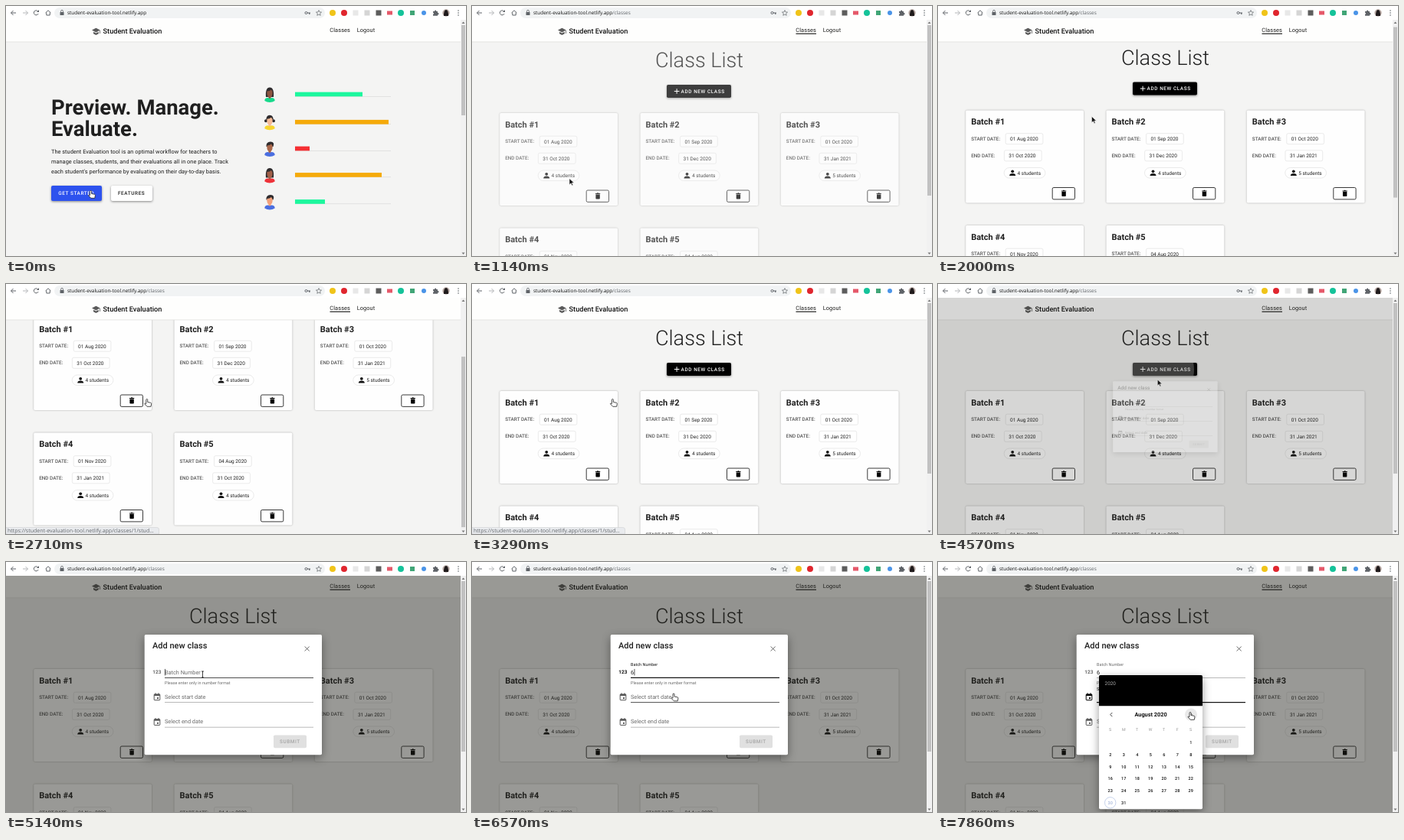
An HTML page that plays this animation: 600x327 px, repeating every 8000 ms.

```html
<!DOCTYPE html>
<html lang="en">
<head>
<meta charset="utf-8">
<title>Student Evaluation</title>
<style>
html, body { margin: 0; width: 100%; height: 100%; overflow: hidden; background: #f4f4f3; }
svg { display: block; width: 100vw; height: 100vh; }
text { font-family: Roboto, sans-serif; white-space: pre; text-rendering: geometricPrecision; }
.ui { font-family: "Open Sans", sans-serif; }
.low { filter: drop-shadow(0 .6px .9px rgba(0,0,0,.3)); }
.mid { filter: drop-shadow(0 1.5px 1.8px rgba(0,0,0,.45)); }
.high { filter: drop-shadow(0 4px 6px rgba(0,0,0,.4)); }
</style>
</head>
<body>
<svg id="stage" viewBox="0 0 600 327" preserveAspectRatio="none"></svg>
<script>
const STEPS_PER_SECOND = 7, LOOP = 8000, LAST = 55;
const INK = '#1f1f1f', GREY = '#6b6b6b';

// Linear interpolation through [step, value] points.
const at = (k, ...points) => {
  if (k <= points[0][0]) return points[0][1];
  for (let i = 1; i < points.length; i++) {
    const [a, u] = points[i - 1], [b, v] = points[i];
    if (k <= b) return u + (v - u) * (k - a) / (b - a);
  }
  return points[points.length - 1][1];
};

const text = (x, y, s, size, fill = INK, extra = '') =>
  `<text x="${x}" y="${y}" font-size="${size}" fill="${fill}" ${extra}>${s}</text>`;
const rect = (x, y, w, h, fill, extra = '') =>
  `<rect x="${x}" y="${y}" width="${w}" height="${h}" fill="${fill}" ${extra}/>`;
const disc = (x, y, r, fill, extra = '') => `<circle cx="${x}" cy="${y}" r="${r}" fill="${fill}" ${extra}/>`;
const path = (d, fill, stroke = 'none', width = 1) =>
  `<path d="${d}" fill="${fill}" stroke="${stroke}" stroke-width="${width}"/>`;
const line = (d, stroke, width) => path(d, 'none', stroke, width);
const group = (extra, ...parts) => `<g ${extra}>${parts.join('')}</g>`;
const move = (x, y, ...parts) => group(`transform="translate(${x} ${y})"`, ...parts);
const MEDIUM = 'font-weight="500"', BOLD = 'font-weight="700"', MIDDLE = 'text-anchor="middle"';
const CAPS = MEDIUM + ' letter-spacing=".57"';

function browserBar(k) {
  const c = '#5f6368';
  const route = k >= 2 ? `<tspan fill="${c}">/classes</tspan>` : '';
  return rect(0, 0, 600, 18, '#fff') + rect(63, 2, 353, 14, '#f1f3f4', 'rx="7"') +
    line('M13 9H6.5M9.5 6l-3 3 3 3', c, 1) + line('M22 9h6.5M25.5 6l3 3-3 3', '#b4b6b9', 1) +
    line('M41.7 7a3 3 0 1 0 .4 3', c, 1) + path('M43 5v3h-3z', c) +
    line('M51.5 9l3.5-3.2L58.5 9M52.8 8.5v3.5h4.4V8.5', c, 1) +
    rect(70.5, 8, 5, 4, c, 'rx=".5"') + line('M71.6 8V6.7a1.4 1.4 0 0 1 2.8 0V8', c, .8) +
    text(80, 11.4, 'student-evaluation-tool.netlify.app' + route, 6.45, '#111', 'class="ui"') +
    disc(391.5, 9, 1.5, 'none', `stroke="${c}"`) + line('M393 9h4M395.8 9v2', c, 1.2) +
    line('M408 5.5l1 2.4 2.6.2-2 1.7.6 2.5-2.2-1.3-2.2 1.3.6-2.5-2-1.7 2.6-.2z', c, .7) +
    disc(426, 9, 4, '#f0c419') + disc(441, 9, 4, '#e0262e') +
    rect(452.5, 5.5, 7, 7, '#e8e8e8') + rect(467.5, 5.5, 7, 7, '#d6d6d6') +
    rect(482.5, 5.5, 7, 7, '#5d5d5d') + rect(497, 6.5, 7, 5, '#e5596a') +
    disc(515, 9, 4, '#15c39a') + rect(527, 6, 6, 6, '#41a577') + disc(545, 9, 3, '#4a94e8') +
    path('M557 7h2a1.2 1.2 0 1 1 2.3 0h1.7v2a1.2 1.2 0 1 1 0 2.3v1.5h-6v-2a1 1 0 0 0 0-2z', c) +
    disc(574, 9, 4.7, '#b9aaa5') + path('M571 13q0-8 3-8t3 8z', '#201b1c') +
    [6, 9, 12].map(y => disc(590, y, .8, c)).join('');
}

function scrollbar(k, scroll) {
  return rect(593, 18, 7, 309, '#f1f1f1') +
    rect(594, 25 + scroll * .73, 5, k < 6 ? 118 : 223, '#c1c1c1') +
    path('M594.5 23l2-2.5 2 2.5zM594.5 322.5l2 2.5 2-2.5z', '#777');
}

function header(k) {
  return rect(0, 18, 593, 29, '#fefefd') + rect(0, 46.6, 593, .7, '#d9d9d8') +
    path('M112 31.6l5.4-2.8 5.4 2.8-5.4 2.9zM114 33.8v2.4l3.4 1.8 3.4-1.8v-2.4l-3.4 1.8zM122 32h.8v4h-.8z', '#5a5a5a') +
    text(126.6, 35.7, 'Student Evaluation', 9.16, '#111', MEDIUM) +
    text(422.3, 33.6, 'Classes', 7.4, INK, 'letter-spacing=".1"') +
    text(457.8, 33.6, 'Logout', 7.4, INK, 'letter-spacing=".05"') +
    (k >= 2 ? rect(422.5, 35.7, 26.5, 1.1, '#111') : '');
}

function avatar(y, skin, shirt, hair) {
  const shapes = {
    long: path('M-5 3Q-6-9.5 0-9.5T5 3z', '#2f2c2e'),
    tails: disc(-5, -2, 2, '#2f2c2e') + disc(5, -2, 2, '#2f2c2e') + path('M-4.6-2Q-5.2-9.5 0-9.5T4.6-2z', '#2f2c2e'),
    short: path('M-4.5-3Q-5-9.5 1-9.5T4.5-3z', '#2f2c2e')
  };
  return move(344, y, shapes[hair], rect(-1.6, 1, 3.2, 5, skin),
    path('M-6.7 8Q-6.7 4.2-2 4q2 2 4 0 4.7.2 4.7 4-3 2-6.7 2t-6.7-2z', shirt),
    path('M-3.6-4.5Q0-4.5 2-6.5L3.6-4v2.5Q3.3 3 0 3T-3.6-1.5z', skin));
}

function home() {
  const rows = [
    [116, 88, '#1cf79d', '#8d5541', '#16d98b', 'long'],
    [152.3, 122, '#f5aa0a', '#f5ba96', '#f7d52f', 'tails'],
    [187, 19, '#f52f33', '#a9674b', '#4a6ee0', 'short'],
    [221.5, 113, '#f5aa0a', '#a05f48', '#ee3138', 'long'],
    [256.5, 39, '#1cf79d', '#f2a07b', '#4a6ee0', 'short']
  ];
  const copy = ['The student Evaluation tool is an optimal workflow for teachers to',
    'manage classes, students, and their evaluations all in one place. Track',
    'each student\'s performance by evaluating on their day-to-day basis.'];
  return text(59, 142.4, 'Preview. Manage.', 27.45, INK, BOLD) + text(59, 170, 'Evaluate.', 27.45, INK, BOLD) +
    copy.map((s, i) => text(59, 193.4 + i * 12.6, s, 7.33, '#1a1a1a', 'letter-spacing=".045"')).join('') +
    rect(59, 235, 66, 20, '#2d52ee', 'rx="2" class="mid"') + text(68.3, 247.3, 'GET STARTED', 6.45, '#fff', CAPS) +
    rect(137, 235, 54, 20, '#fff', 'rx="2" class="mid"') + text(146, 247.3, 'FEATURES', 6.45, INK, CAPS) +
    rows.map(([y, w, color, skin, shirt, hair]) => avatar(y, skin, shirt, hair) +
      rect(377, y + 2, 125, .6, '#d5d5d5') + rect(377, y - 3.4, w, 5.7, color)).join('');
}

function card(x, y, name, start, end, count) {
  const row = (label, date, top, left) =>
    text(7, top + 9, label, 6.4, '#555', MEDIUM) +
    rect(left, top, 48.7, 14, '#fff', 'rx="2" stroke="#dcdcdc" stroke-width=".6"') +
    text(left + 5.9, top + 9.4, date, 6.5);
  return move(x, y, rect(0, 0, 153.8, 121, '#fefefe', 'rx="1.8" class="low"'),
    text(7, 18.8, name, 11, INK, BOLD), row('START DATE:', start, 30.2, 52), row('END DATE:', end, 52.3, 50.2),
    rect(50, 75, 53.7, 13.6, '#fff', 'rx="6.8" stroke="#dcdcdc" stroke-width=".6"'),
    disc(61, 79.8, 1.9, '#111'), path('M57 85.6q0-3 4-3t4 3z', '#111'),
    text(67.4, 84.3, count + ' students', 6.5),
    rect(113, 101, 29.3, 15.4, '#fff', 'rx="1.7" stroke="#222" stroke-width=".9"'),
    path('M124.8 105h2l.5-.7h1.2l.5.7h2v.9h-6.2zM125.2 106.5h5.4v5.3q0 .8-.8.8h-3.8q-.8 0-.8-.8z', '#000'));
}

function classList(k) {
  const batches = [
    ['01 Aug 2020', '31 Oct 2020', 4], ['01 Sep 2020', '31 Dec 2020', 4], ['01 Oct 2020', '31 Jan 2021', 5],
    ['01 Nov 2020', '31 Jan 2021', 4], ['04 Aug 2020', '31 Oct 2020', 4]
  ];
  const radius = at(k, [29, 0], [30, 12], [32, 48]), glow = at(k, [32, .27], [35, 0]);
  return text(296.5, 80, 'Class List', 27.1, INK, 'font-weight="300" ' + MIDDLE) +
    rect(254, 103, 84, 17, '#000', 'rx="1.8" class="mid"') +
    group('clip-path="url(#button)"', disc(286, 112, radius, '#fff', `opacity="${glow}"`)) +
    line('M263.8 111.5h6.6M267.1 108.2v6.6', '#fff', 1) +
    text(272.6, 113.9, 'ADD NEW CLASS', 6.45, '#fff', CAPS) +
    batches.map((b, i) => card(36.2 + i % 3 * 183.3, 140 + (i > 2) * 150.5, 'Batch #' + (i + 1), ...b)).join('');
}

const calendarIcon = (y, color) =>
  rect(193.2, y - 3.2, 7.6, 7.6, 'none', `rx=".6" stroke="${color}" stroke-width="1"`) +
  rect(193.2, y - 3.5, 7.6, 2.2, color) + line(`M195 ${y - 5}v2M199 ${y - 5}v2`, color, 1) + rect(197, y + .8, 2, 2, color);

// Text field whose label floats up and whose underline grows when focused.
function field(y, label, { float = 0, focus = 0, hover = false, value = '', caret = false }) {
  const half = 97 * focus;
  return rect(207, y - .4, 194, hover ? .8 : .6, hover ? '#222' : '#8a8a8a') +
    (focus ? rect(304 - half, y - .6, half * 2, 1.1, '#000') : '') +
    text(207, y - 4.9 - 10.5 * float, label, 7.33 - 1.83 * float, focus ? '#111' : GREY) +
    text(207, y - 4.9, value, 7.33) + (caret ? rect(value ? 211.6 : 207, y - 11.5, .7, 8.5, '#111') : '');
}

function dialog(k) {
  const scale = at(k, [31, .3], [32, .59], [33, .88], [34, 1]);
  const opacity = at(k, [31, 0], [32, .24], [33, .8], [34, 1]);
  const typing = k >= 36 && k < 49, typed = k >= 43;
  const batch = {
    float: at(k, [36, 0], [38, 1]), focus: typing ? at(k, [36, 0], [38, 1]) : 0, hover: k > 34 && k < 43,
    value: typed ? '6' : '', caret: typing && (k - (typed ? 43 : 36)) % 7 < 4
  };
  const start = { float: at(k, [49, 0], [51, 1]), focus: at(k, [49, 0], [51, 1]), hover: k > 44 && k < 51 };
  return group(`opacity="${opacity}" transform="translate(296.5 173.5) scale(${scale}) translate(-296.5 -173.5)"`,
    rect(180.7, 95, 231.3, 157.3, '#fff', 'rx="1.8" class="high"'),
    text(191, 113.2, 'Add new class', 11, INK, MEDIUM),
    line('M389.7 110.5l6 6M395.7 110.5l-6 6', '#555', .9),
    text(191.3, 146.3, '123', 6.4, k > 36 && k < 49 ? '#111' : '#666', BOLD),
    field(151.4, 'Batch Number', batch), text(207, 159.6, 'Please enter only in number format', 5.5, GREY),
    calendarIcon(176.3, k > 49 ? '#000' : '#555'), field(183.7, 'Select start date', start),
    calendarIcon(209, '#555'), field(216.2, 'Select end date', {}),
    rect(349, 226.4, 43, 16.8, '#e0e0e0', 'rx="1.8"'), text(357, 237.1, 'SUBMIT', 6.45, '#a4a4a4', CAPS));
}

function calendar(k) {
  const scale = at(k, [49, .3], [52, 1]), opacity = at(k, [49, 0], [52, 1]);
  const column = i => 224.7 + i * 17.5;
  const days = Array.from({ length: 31 }, (_, i) => {
    const cell = i + 6, today = i === 29;
    return text(column(cell % 7), 238 + Math.floor(cell / 7) * 15.75, i + 1, 5.5,
      today ? '#8aa0cf' : '#111', MIDDLE + (today ? '' : ' ' + MEDIUM));
  });
  return group(`opacity="${opacity}" transform="translate(210 148) scale(${scale}) translate(-210 -148)"`,
    rect(210, 148, 135, 175.3, '#fff', 'rx="1.8" class="high"'),
    path('M210 188.3v-38.5q0-1.8 1.8-1.8h131.4q1.8 0 1.8 1.8v38.5z', '#000'),
    text(217.6, 160.5, '2020', 6.4, '#a9a9a9'),
    k >= 54 ? disc(330, 199.5, 8, '#e9e9e9') : '',
    line('M227.3 197l-2.5 2.6 2.5 2.6M328.7 197l2.5 2.6-2.5 2.6', '#444', 1),
    text(277.5, 202.1, 'August 2020', 7.33, '#111', BOLD + ' ' + MIDDLE),
    ...[...'SMTWTFS'].map((d, i) => text(column(i), 221, d, 5.3, '#969696', MIDDLE)),
    disc(224.7, 314.8, 7.2, 'none', 'stroke="#9fb4dd" stroke-width=".6"'), ...days);
}

const CURSOR = [
  [0, 110.5, 241.5, 'hand'], [4, 110.5, 241.5, 'arrow'], [6, 111, 241], [9, 135, 218], [13, 197, 150], [14, 200.5, 144.5],
  [16, 184, 150.5, 'hand'], [24, 183.3, 150.5], [26, 215, 132, 'arrow'], [28, 280, 113, 'hand'], [31, 286, 113],
  [32, 286.3, 125, 'arrow'], [34, 274, 136], [35, 262, 145, 'beam'], [36, 256.5, 147], [43, 256.5, 148],
  [45, 262, 168, 'hand'], [46, 263, 172], [49, 263, 173], [51, 276, 177, 'arrow'], [53, 315, 193], [54, 326, 196, 'hand'], [55, 329, 196.5]
];
const POINTERS = {
  hand: path('M-1 5.5V1a1 1 0 0 1 2 0v3l4 .8q1 .3.9 1.3l-.6 3.7H.3L-3 6.3q0-1.5 2-.2z', '#fff', '#222', .8),
  arrow: path('M0 0v8l2-1.8 1.4 3 1.3-.6-1.4-2.9h2.7z', '#111', '#fff', .5),
  beam: line('M-1.5-4h3M0-4v8M-1.5 4h3', '#111', .8)
};

function cursor(k) {
  const axis = i => at(k, ...CURSOR.map(p => [p[0], p[i]]));
  const shape = CURSOR.filter(p => p[0] <= k && p[3]).pop()[3];
  return move(axis(1), axis(2), POINTERS[shape]);
}

function scene(k) {
  const scroll = at(k, [13, 0], [14, 3.5], [15, 30], [17, 96], [19, 96], [21, 32], [22, 12], [23, 0]);
  const shade = at(k, [31, 0], [32, .18], [33, .34], [35, .46]);
  return '<clipPath id="button"><rect x="254" y="103" width="84" height="17" rx="1.8"/></clipPath>' +
    rect(0, 0, 600, 327, '#f4f4f3') +
    (k < 4 ? group(`opacity="${at(k, [1, 1], [4, 0])}"`, home()) : '') +
    (k > 5 ? group(`opacity="${at(k, [5, 0], [9, 1])}" transform="translate(0 ${-scroll})"`, classList(k)) : '') +
    header(k) + (shade ? rect(0, 18, 593, 309, '#21211c', `opacity="${shade}"`) : '') + scrollbar(k, scroll) +
    (k > 31 ? dialog(k) : '') + (k > 49 ? calendar(k) : '') + browserBar(k) +
    (k >= 16 && k < 26 ? path('M0 318.5h197q2.5 0 2.5 2.5v6H0z', '#e9ebee', '#c8cacd', .5) +
      text(2, 325.3, 'https://student-evaluation-tool.netlify.app/classes/1/stud…', 7, '#5f6368', 'class="ui"') : '') +
    cursor(k);
}

const stage = document.getElementById('stage');
const origin = performance.now();
let shown = -1;
function tick() {
  const time = (performance.now() - origin) % LOOP;
  const k = Math.min(LAST, Math.floor((time + 4) * STEPS_PER_SECOND / 1000));
  if (k !== shown) stage.innerHTML = scene(shown = k);
  requestAnimationFrame(tick);
}
tick();
</script>
</body>
</html>
```
